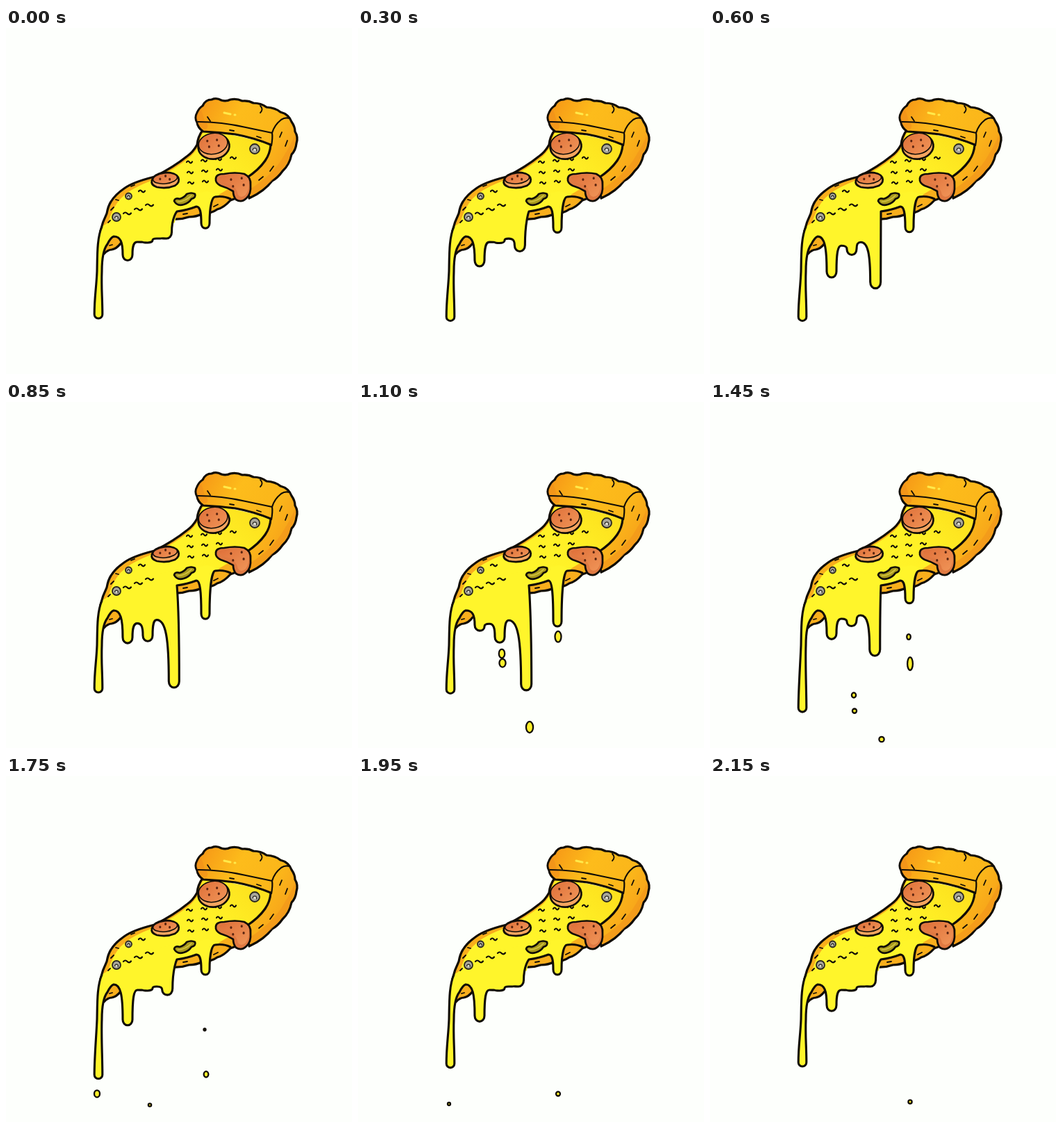
Recreate the animation shown at these times as an HTML page. Size 498 px wide and 498 px high, loop 2.2 s.

```html
<!DOCTYPE html>
<html lang="en">
<head>
<meta charset="utf-8">
<title>Melting pizza</title>
<style>
  html, body { margin: 0; width: 100%; height: 100%; overflow: hidden; background: #fdfffc; }
  svg { display: block; width: 100vw; height: 100vh; }
  .ink { fill: none; stroke: #100c06; stroke-width: 3.1; stroke-linecap: round; stroke-linejoin: round; }
  .thin { stroke-width: 1.8; }
  .line { stroke: #100c06; stroke-width: 2.7; stroke-linejoin: round; }
  .bold { stroke-width: 3.2; }
</style>
</head>
<body>
<svg viewBox="0 0 498 498">
  <defs>
    <linearGradient id="melt" gradientUnits="userSpaceOnUse" x1="350" y1="150" x2="250" y2="250">
      <stop offset="0" stop-color="#fde11e"/>
      <stop offset=".5" stop-color="#fff026"/>
      <stop offset="1" stop-color="#fff52b"/>
    </linearGradient>
    <linearGradient id="bake" gradientUnits="userSpaceOnUse" x1="275" y1="130" x2="400" y2="200">
      <stop offset="0" stop-color="#f79c17"/>
      <stop offset=".35" stop-color="#fdbc1b"/>
      <stop offset=".75" stop-color="#fbb61a"/>
      <stop offset="1" stop-color="#f7a41a"/>
    </linearGradient>
    <linearGradient id="meat" x1="0" y1="0" x2="1" y2="1">
      <stop offset="0" stop-color="#df7039"/>
      <stop offset="1" stop-color="#f09558"/>
    </linearGradient>
  </defs>

  <g id="drops" class="line" fill="#fff02b" style="stroke-width:2.3"></g>

  <!-- slice base and cheese -->
  <path class="line bold" fill="#f9ae1c" d="M283 147Q276 157 275 168Q269 179 260 185Q243 199 214 214Q182 222 170 231Q157 240 151 250Q147 256 145 267Q139 279 136 292L134 310L141 325Q147 319 152 319Q159 318 165 310L240 275Q252 276 263 272Q274 272 283 267Q296 267 304 261Q313 259 323 248L350 238Q376 222 381 168Z"/>
  <path fill="url(#melt)" d="M285 148Q279 157 278 168Q272 180 262 188Q243 203 216 217Q179 231 169 242Q156 252 147 280L138 290L137 300L155 300L190 307L243 280L246 264L274 257L301 243L350 214Q377 190 381 168Q333 153 285 148Z"/>
  <path id="cheese" fill="#fff52b"/>
  <path id="edge" class="ink"/>

  <!-- crust -->
  <path class="line bold" fill="url(#bake)" d="M284 149Q276 144 275 136Q271 129 275 122Q278 115 283 112Q287 103 296 103Q303 100 310 104Q317 106 323 103Q332 101 340 105Q349 104 356 108Q367 108 375 114Q388 115 395 121Q407 124 411 135Q416 142 416 149Q421 157 418 166Q417 176 411 182Q408 197 398 206Q391 216 383 220Q372 235 350 245L346 216Q364 204 373 191Q380 181 381 168Q357 158 330 153Q308 150 284 149Z"/>
  <path fill="#f08f1a" opacity=".6" d="M275 134Q272 126 280 116Q284 125 286 134Q294 142 287 146Q278 144 275 134Z"/>
  <path fill="#f3981b" opacity=".7" d="M416 154Q418 164 410 180Q403 200 390 212Q374 230 352 242L351 232Q385 211 400 184Q411 166 416 154Z"/>
  <path class="ink" style="stroke-width:2.2" d="M276 135Q310 135 345 143Q364 147 383 151M382 169Q384 158 383 151Q386 140 396 132Q402 128 408 130"/>
  <path class="ink thin" d="M290 128l4 6M366 112Q371 117 366 122M322 147l6 1M361 156l6 2M397 150l-3 7M405 162l-3 8M385 199l-5 7M364 219l6-5"/>
  <path fill="none" stroke="#ffe94a" stroke-width="3" stroke-linecap="round" d="M314 122l9 2M329 125l1 0"/>

  <path id="flecks" class="ink" style="stroke-width:2.2"/>
  <path class="ink thin" d="M151 262l4-4M158 247l4 1M180 228l5-2M147 280l3-3M149 313l4-1M255 268l6-1M299 257l6-3"/>

  <!-- toppings -->
  <g class="line">
    <ellipse cx="299" cy="170.500" rx="22.500" ry="18" fill="#f5a55f" transform="rotate(-8 299 170)"/>
    <ellipse cx="298" cy="166.500" rx="21" ry="15" fill="url(#meat)" stroke-width="1.6" transform="rotate(-10 298 166)"/>
    <path fill="#f5a55f" d="M210 219Q213 210 227 208Q243 207 248 215Q251 222 243 227Q231 232 217 229Q208 226 210 219Z"/>
    <ellipse cx="229" cy="216.500" rx="17.500" ry="7.500" fill="url(#meat)" stroke-width="1.6" transform="rotate(-6 229 216)"/>
    <path fill="#e07a42" d="M302 217Q302 210 314 210Q330 207 343 210Q353 215 352 226Q353 239 346 245Q339 252 331 247Q327 242 327 235Q319 230 309 227Q301 223 302 217Z"/>
    <path fill="url(#meat)" stroke="none" d="M307 215Q312 211 326 211Q343 209 349 217Q352 230 345 240Q338 246 334 240Q332 230 324 225Q308 222 307 215Z"/>
    <path fill="#a99a1d" d="M242 249Q243 244 250 246Q257 244 260 239Q267 236 272 239Q274 244 267 246Q263 252 256 254Q246 257 242 249Z"/>
  </g>
  <path class="ink" style="stroke:#d4c544;stroke-width:1.6" d="M247 250Q258 250 267 241"/>
  <path id="pits" fill="#5a2410"/>
  <g id="rings" fill="#aaa89c" stroke="#29271f" stroke-width="1.8"></g>
</svg>
<script>
const LOOP = 2200, STEP = 50, HOLD = 150;
const $ = id => document.getElementById(id);
const mix = (a, b, p) => a + (b - a) * p;
const clamp = (v, lo, hi) => Math.min(hi, Math.max(lo, v));
const linear = p => p;
const smooth = p => p * p * (3 - 2 * p);

function set(el, attrs) {
  for (const k in attrs) el.setAttribute(k, attrs[k]);
}
function add(parent, name, attrs = {}) {
  const el = document.createElementNS("http://www.w3.org/2000/svg", name);
  set(el, attrs);
  return parent.appendChild(el);
}

// Wavy marks: three shortening rows near the crust, one row near the tip
const fleck = (x, y, w) => `M${x} ${y}q${w / 4} -3 ${w / 2} 0t${w / 2} -.5`;
let marks = "";
for (let row = 0; row < 3; row++)
  for (let col = 0; col < 4 - row; col++)
    marks += fleck(260 + 21 * col + row, 193 + 15 * row - 2 * col, 8);
for (let i = 0; i < 3; i++) marks += fleck(169 + 16 * i, 267 - 6 * i, 11);
$("flecks").setAttribute("d", marks + fleck(191, 235, 9));

// Pits spread round the middle of each sausage slice
function pits(cx, cy, rx, ry, n) {
  let d = "";
  for (let i = 0; i < n; i++) {
    const a = i / n * 2 * Math.PI + .6;
    d += `M${cx + rx * Math.cos(a) - 1.6} ${cy + ry * Math.sin(a)}a1.6 1.9 0 1 0 3.2 0a1.6 1.9 0 1 0 -3.2 0`;
  }
  return d;
}
$("pits").setAttribute("d", pits(298, 166, 10, 6, 4) + pits(229, 216, 8, 3, 3) + pits(333, 222, 11, 7, 4));

for (const [x, y, r] of [[358, 174, 7], [176.5, 242, 4.5], [159, 272, 6]]) {
  add($("rings"), "circle", { cx: x, cy: y, r });
  add($("rings"), "path", { d: `M${x - r * .4} ${y + r * .3}a${r * .4} ${r * .4} 0 1 1 ${r * .7} ${r * .2}`,
    fill: "#dddcd2", "stroke-width": 1.3 });
}

// Rounded swell around a peak time, reaching zero at peak ± reach
function swell(t, { peak, reach, by }) {
  const d = Math.abs(t - peak), gap = Math.min(d, LOOP - d);
  return gap < reach ? by * Math.cos(Math.PI / 2 * gap / reach) ** 2 : 0;
}

// Tip x, half width, resting y and the swells that stretch each drip
const drips = {
  far: { x: 133, w: 5.8, rest: 418, swells: [{ peak: 450, reach: 400, by: 5 }, { peak: 1530, reach: 500, by: 30 }] },
  second: { x: 175, w: 7, rest: 327, swells: [{ peak: 600, reach: 600, by: 32 }, { peak: 1780, reach: 620, by: 32 }] },
  third: { x: 204, w: 7, rest: 309, swells: [{ peak: 1000, reach: 750, by: 39 }] },
  fourth: { x: 231, w: 7.5, rest: 303, drift: .1, swells: [{ peak: 1000, reach: 950, by: 115 }] },
  last: { x: 287, w: 6, rest: 286, swells: [{ peak: 400, reach: 600, by: 9 }, { peak: 1050, reach: 500, by: 38 }] }
};
function tip(name, t) {
  const { x, w, rest, drift = 0, swells } = drips[name];
  const grow = swells.reduce((sum, s) => sum + swell(t, s), 0);
  return { x: x + drift * grow, y: rest + grow, w, grow };
}

// One drip hanging between the points a and b
function drip({ x, y, w }, a, b, lean = .75) {
  const l = x - w, m = x + w;
  const rl = clamp((y - a[1]) * .6, .3, w * 1.2), rr = clamp((y - b[1]) * .6, .3, w * 1.2);
  const yl = y - rl, yr = y - rr;
  return `C${mix(a[0], l, .75)} ${a[1]} ${l} ${mix(yl, a[1], .7)} ${l} ${yl}` +
    `C${l} ${y - rl * .4} ${x - w * .55} ${y} ${x} ${y}` +
    `C${x + w * .55} ${y} ${m} ${y - rr * .4} ${m} ${yr}` +
    `C${m} ${mix(yr, b[1], .7)} ${mix(b[0], m, lean)} ${b[1]} ${b}`;
}

// The long drip at the point of the slice: thin neck, round bulb
function longDrip({ x, y, w }) {
  const l = x - w, m = x + w, low = y - w;
  return `M138 286C131 302 131.500 325 131 350C130 375 ${l} ${low - 25} ${l} ${low}` +
    `A${w} ${w} 0 0 0 ${m} ${low}` +
    `C${m} ${low - 25} 137 375 138 350C138 335 139 320 146 311Q151 301 155 300`;
}

function cheese(t) {
  const third = tip("third", t), sag = third.grow * .3;
  const v0 = [155, 300], v1 = [189, 308 + sag], v2 = [217, 303 + sag], v3 = [246, 264];
  return longDrip(tip("far", t)) +
    drip(tip("second", t), v0, v1) +
    drip(third, v1, v2) +
    drip(tip("fourth", t), v2, v3, 0) +
    "Q261 262 274 257" +
    drip(tip("last", t), [274, 257], [301, 243], .5) + "Q313 241 323 246";
}

// Falling drops: life span, path, shrinking radius and early stretch
const falls = [
  { x: 207, from: 1000, to: 1800, y: [345, 482], r: [4.5, 2], tall: 2 },
  { x: 208, from: 1000, to: 1650, y: [356, 484], r: [5, 2.2], tall: 1 },
  { x: 288, from: 1050, to: 2150, y: [337, 469], r: [4.6, 2.6], tall: 6, ease: smooth },
  { x: 286, from: 1250, to: 1750, y: [320, 365], r: [3.6, 1.5], tall: 2 },
  { x: 247, from: 1000, to: 1600, y: [463, 493], r: [5.5, 3], tall: 2 },
  { x: 131, from: 1650, to: 1950, y: [450, 472], r: [5, 2], tall: 1 }
].map(f => ({ ease: linear, ...f, el: add($("drops"), "ellipse") }));

function fall({ x, from, to, y, r, tall, ease, el }, t) {
  const p = (t - from) / (to - from);
  el.style.display = p >= 0 && p <= 1 ? "" : "none";
  const rx = mix(...r, p);
  const ry = rx * (1 + tall * Math.sin(Math.PI * clamp(p, 0, 1)) * (1 - p) ** 3);
  if (p >= 0 && p <= 1) set(el, { cx: x, cy: mix(...y, ease(p)), rx, ry });
}

function draw(t) {
  const d = cheese(t);
  $("edge").setAttribute("d", d);
  $("cheese").setAttribute("d", d + "L290 235L200 250L155 275Z");
  falls.forEach(f => fall(f, t));
}

function tick() {
  const t = performance.now() % LOOP;
  draw(t < HOLD ? 0 : Math.floor(t / STEP) * STEP);
  requestAnimationFrame(tick);
}
tick();
</script>
</body>
</html>
```
